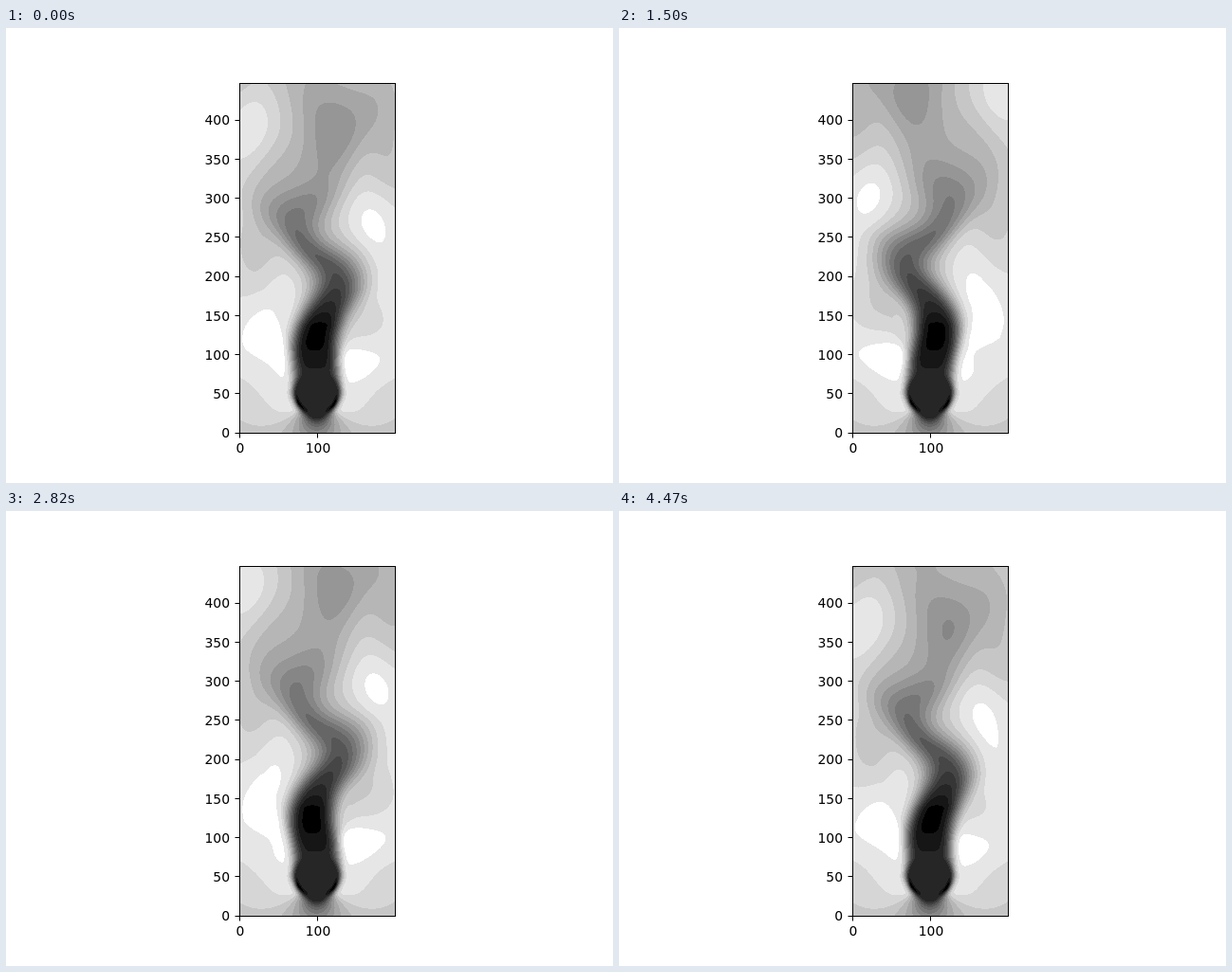
These frames come from a looping animation (640 px wide and 480 px high, 4.5 s). An HTML page with a canvas:

```html
<!DOCTYPE html>
<html lang="en">
<head>
<meta charset="utf-8">
<title>Wake behind a cylinder</title>
<style>
  html, body { margin: 0; width: 100%; height: 100%; overflow: hidden; background: #fff; }
  canvas { position: absolute; left: 247px; top: 59px; }
  svg { position: absolute; left: 0; top: 0; }
  text { font: 13.89px "DejaVu Sans", sans-serif; }
</style>
</head>
<body>
<canvas id="flow" width="163" height="368"></canvas>
<svg id="axes" width="640" height="480" viewBox="0 0 640 480">
  <rect x="246.5" y="58.5" width="164" height="369" fill="none" stroke="#000"/>
</svg>
<script>
const LEFT = 245.9, BOTTOM = 427.2, SCALE = 0.825;
const STEP = 30, STEPS = 150, PERIOD = 30.2;
const TAU = 2 * Math.PI;
const MID = 99, CYL_Y = 50, SPAN = 10.3;

// Axes
const axes = document.getElementById('axes');
function add(tag, attrs, label = '') {
  const el = document.createElementNS(axes.namespaceURI, tag);
  for (const key in attrs) el.setAttribute(key, attrs[key]);
  el.textContent = label;
  axes.append(el);
}
for (let v = 0; v <= 400; v += 50) {
  const y = BOTTOM - v * SCALE;
  add('path', { d: `M241.5 ${Math.floor(y) + 0.5}H246.5`, stroke: '#000' });
  add('text', { x: 236, y: Math.round(y + 5.05), 'text-anchor': 'end' }, v);
}
for (const v of [0, 100]) {
  const x = Math.round(LEFT + v * SCALE);
  add('path', { d: `M${x + 0.5} 427.5V432.5`, stroke: '#000' });
  add('text', { x: x + 1, y: 448, 'text-anchor': 'middle' }, v);
}

const ramp = (a, b, v) => {
  const k = Math.min(1, Math.max(0, (v - a) / (b - a)));
  return k * k * (3 - 2 * k);
};
const bell = (v, width) => Math.exp(-((v / width) ** 2));

// How the wake and the flow beside it change downstream
function makeRow(y) {
  const recovery = 1 - Math.exp(-Math.max(0, y - 138) / 105);
  return {
    y,
    core: 2.5 - 1.8 * ramp(60, 122, y) + 9.2 * recovery,
    width: 30 + 22 * ramp(150, 370, y),
    sharp: 5 - 3 * ramp(60, 220, y),
    outer: 12.2 + 1.7 * ramp(35, 110, y) - 0.8 * ramp(300, 450, y),
    swing: 1.6 * ramp(40, 200, y),
    meander: 30 * ramp(60, 230, y) - 6 * ramp(240, 330, y),
    phase: (y - 122) / (y > 122 ? 268 : 95),
    wakePhase: (y - 122) / 268 - 0.27 * (1 - ramp(150, 330, y)),
    tilt: 0.003 * ramp(180, 260, y),
    pulse: ramp(250, 330, y),
    wake: ramp(38, 54, y),
    lane: Math.max(50, 62 + (y - 160) * 0.095)
  };
}

// Speed change around the cylinder, as in potential flow
function bendAt(dx, dy) {
  const along = dy > 0 ? dy / 2 : dy;
  const rr = Math.max(dx * dx + along * along, 400);
  const dipole = (dx * dx - along * along) / (rr * rr) * SPAN;
  if (dipole > 0) return 2.2 * Math.tanh(1089 * dipole / 2.2);
  return dy > 0 ? 0 : 900 * dipole;
}

function makeCell(x, row) {
  const dx = x - MID, dy = row.y - CYL_Y;
  const r = Math.hypot(dx, dy);
  const off = Math.abs(dx) - row.lane;
  return {
    x,
    base: row.outer + bendAt(dx, dy),
    swing: -row.swing * Math.tanh(dx / 15) * bell(off, 38),
    phase: row.phase + 0.0035 * off * ramp(100, 180, row.y),
    wakePhase: row.wakePhase - row.tilt * (Math.hypot(dx, 20) - 30),
    layer: r < 25 ? 0 : 1 - bell(r - 25, 6),
    dip: 2.4 * ramp(8, 14, Math.abs(dx)) * bell(r - 26, 2.6) * bell(row.y - 37, 9)
  };
}

const canvas = document.getElementById('flow');
const ctx = canvas.getContext('2d');
const W = canvas.width, H = canvas.height;
const image = ctx.createImageData(W, H);
const pixels = new Uint32Array(image.data.buffer);

const greys = Array.from({ length: 16 }, (_, i) => {
  const g = i === 0 ? 0 : i === 15 ? 255 : 6 + 16 * i;
  return (0xff000000 | g << 16 | g << 8 | g) >>> 0;
});

const rows = Array.from({ length: H }, (_, j) => {
  const row = makeRow((BOTTOM - (j + 59.5)) / SCALE);
  row.cells = Array.from({ length: W }, (_, i) => makeCell((i + 247.5 - LEFT) / SCALE, row));
  return row;
});

function draw(cycle) {
  let n = 0;
  for (const row of rows) {
    const beat = row.pulse * (1 - Math.cos(2 * TAU * (row.phase - cycle)));
    const core = row.core + 0.75 * beat;
    for (const c of row.cells) {
      const center = MID + row.meander * Math.cos(TAU * (c.wakePhase - cycle));
      const d = Math.abs(c.x - center) / row.width;
      let v = c.base - 0.35 * beat + c.swing * Math.cos(TAU * (c.phase - cycle));
      v = Math.max(2.4, v);
      v += (core - v) * row.wake * Math.exp(-Math.pow(d, row.sharp));
      v = 2.4 + (v - 2.4) * c.layer - c.dip;
      pixels[n++] = greys[Math.max(0, Math.min(15, Math.floor(v)))];
    }
  }
  ctx.putImageData(image, 0, 0);
}

let shown = -1;
const start = performance.now();
function tick() {
  const step = Math.floor((performance.now() - start) / STEP) % STEPS;
  if (step !== shown) {
    shown = step;
    draw(step / PERIOD);
  }
  requestAnimationFrame(tick);
}
tick();
</script>
</body>
</html>
```
